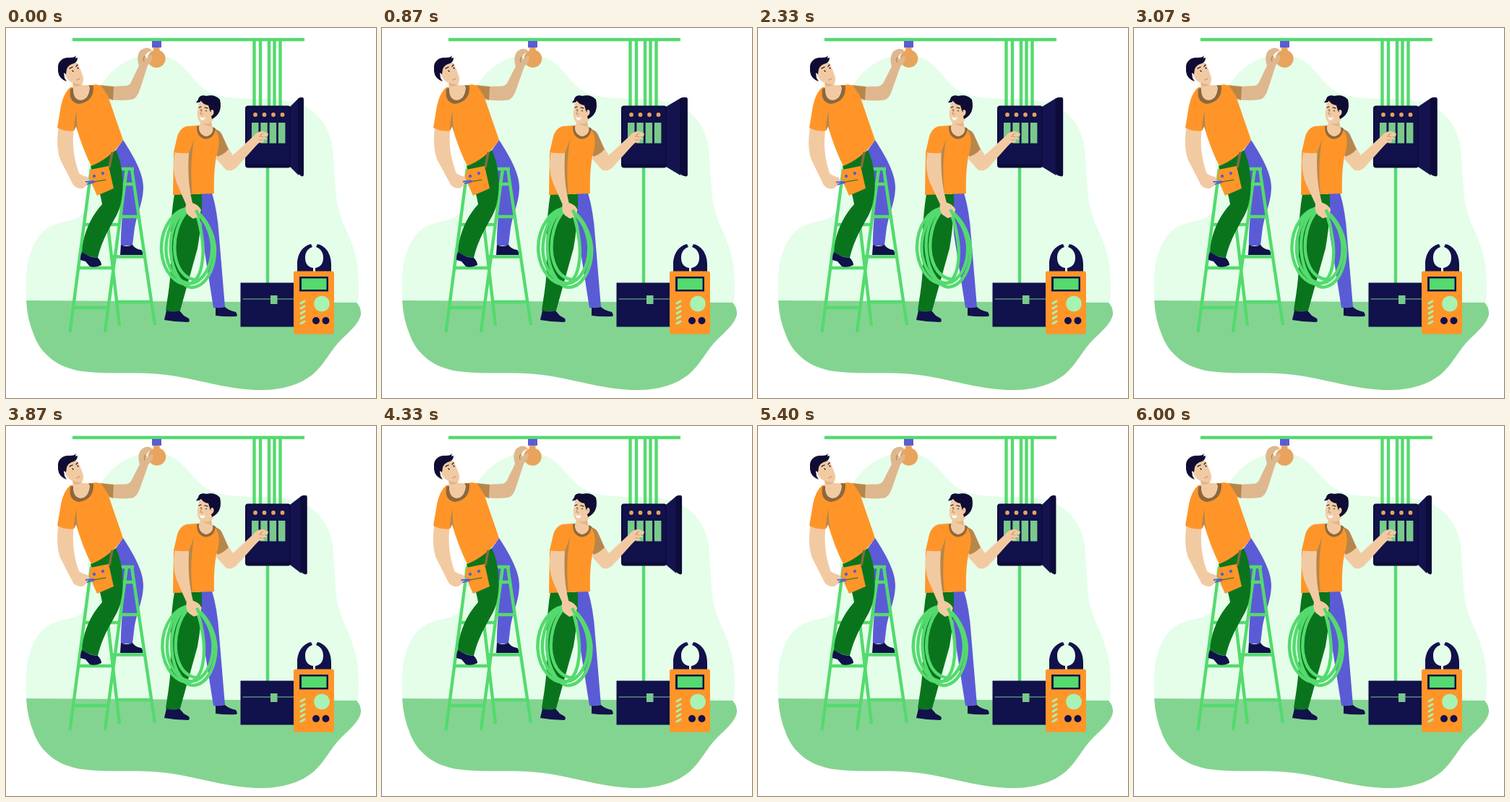
Write an HTML page that moves like this. It is 512 by 512 pixels and loops after 6030 ms.

```html
<!DOCTYPE html>
<html lang="en">
<head>
<meta charset="utf-8">
<title>Electricians at work</title>
<style>
html, body { margin: 0; width: 100%; height: 100%; overflow: hidden; background: #fff; }
svg { display: block; width: 100vw; height: 100vh; }
.wire { fill: none; stroke: #54da6e; stroke-width: 4.4; }
.thin { fill: none; stroke-width: 1.2; stroke-linecap: round; }
.navy { fill: #11114b; }
.hair { fill: #0f0c33; }
.orange { fill: #ff9528; }
.copper { fill: #e8a35c; }
.brown { fill: #b8864a; }
.collar { fill: #8a6840; }
.skin { fill: #f2caa2; }
.shade { fill: #dfb78f; }
.violet { fill: #5b5bd6; }
.green { fill: #0a741d; }
.sage { fill: #7ac98b; }
</style>
</head>
<body>
<svg viewBox="0 0 512 512">
  <!-- backdrop -->
  <path fill="#e4fee9" d="M28 378C26 340 29 305 51 282C68 266 88 270 102 261C121 247 112 195 111 150C112 105 130 72 157 52C180 36 206 33 226 41C251 51 259 79 286 91C314 102 360 94 396 102C426 109 446 133 451 160C456 188 453 220 460 250C467 277 484 300 487 335Q489 355 487 381Z"/>
  <path fill="#84d491" d="M28 377L485 380Q492 387 491 397C488 410 475 420 464 431C449 446 441 465 426 478C405 496 376 502 345 501C300 499 267 486 222 480C180 475 145 480 105 475C72 470 49 452 39 426Q29 402 28 377Z"/>

  <!-- wiring and fuse box -->
  <path class="wire" d="M92 16H413M343.500 18V109M352 18V109M364 18V109M371.500 18V109M379.500 18V109M362 190V354"/>
  <path id="doorFace" fill="#15134f"/>
  <path id="doorRim" fill="#0d0b38"/>
  <rect x="331" y="107.500" width="63" height="86" rx="4" fill="#0d0b38"/>
  <rect x="333" y="109.500" width="59" height="79" rx="3" class="navy"/>
  <g id="fuses"></g>

  <!-- toolbox and clamp meter -->
  <path class="navy" d="M324.500 352.500H400V413.500H324.500Z"/>
  <path class="thin" stroke="#7ac98b" d="M328 375H399"/>
  <rect class="sage" x="366" y="370" width="9.500" height="12"/>
  <path class="navy" d="M403 338V327C403 311 412 301 422 299L424 303C416 306 414 312 414 318C414 326 418 331 425 332V338ZM450 338V327C450 311 441 301 431 299L429 303C437 306 439 312 439 318C439 326 435 331 428 332V338Z"/>
  <rect class="orange" x="398" y="336.500" width="56" height="87" rx="3"/>
  <rect class="navy" x="406" y="344" width="40" height="20.500"/>
  <rect x="409" y="346.500" width="34.500" height="15.500" fill="#54da6e"/>
  <circle cx="437" cy="381.500" r="10.800" fill="#a8f3b4"/>
  <path d="M408 381l5-3m-5 10l5-3m-5 10l5-3m-5 10l5-3m-5 10l5-3" fill="none" stroke="#a8f3b4" stroke-width="3" stroke-linecap="round"/>
  <circle class="navy" cx="429" cy="405" r="5"/>
  <circle class="navy" cx="442.500" cy="405" r="5"/>

  <!-- man on the ladder -->
  <path class="violet" d="M150 172L162 155C175 175 190 200 190 220C190 240 182 255 178 276L175 301H159C158 275 165 240 160 215Z"/>
  <path class="navy" d="M159 300Q167 304 175 300Q179 306 187 307Q190 310 189 314H158Z"/>
  <path class="wire" d="M117 195H177M118 195L88.500 421M167 195L137 421M132 195L157 412M174 195L206 411M156 216H178M160 261H184M145 316.500H191M151 379H201M108 272H158M100 332H150M94 387H142"/>
  <path class="green" d="M117 191L152 169C162 190 164 220 159 242C156 262 137 278 127 318Q117 317 105 311C106 285 118 260 133 244C130 225 122 205 117 191Z"/>
  <path class="navy" d="M105 310Q115 317 127 318Q132 323 132 328Q125 332 116 330L110 323L103 321Q103 314 105 310Z"/>
  <g id="bulb">
    <path class="copper" d="M204 26H212.500V32H204Z"/>
    <circle class="copper" cx="208.300" cy="42.500" r="12.300"/>
  </g>
  <rect class="violet" x="202" y="18" width="13" height="9"/>
  <g id="raisedArm">
    <path class="shade" d="M144 81L166 80Q172 79 174 73L184 52C181 43 182 36 186 31Q192 26 198 28L202 31L196 34L192 39L195 42L200 37L203 39L201 46L196 52L185 86Q181 98 174 99Q160 101 142 99Z"/>
    <path class="thin" stroke="#b8864a" d="M192 39Q189 42 191 46"/>
  </g>
  <path class="brown" d="M130 79L149 81L148 100L140 96Z"/>
  <path id="loweredArm" class="skin" d="M73 134C69 160 72 175 76 184L93 217Q98 223 106 222L113 217L111 213L116 211L113 206Q106 205 101 201C94 181 91 162 94 138L88 120Z"/>
  <path class="orange" d="M89 82Q80 89 76 108L71 138Q83 144 94 142L97 136Q105 165 118 191Q145 180 162 155L141 94L132 80Q126 77 118 79Z"/>
  <path class="brown" d="M98 115Q94 127 94 142L97 136L100 144Q97 130 98 115Z"/>
  <path class="collar" d="M89 84Q86 103 101 105Q122 102 121 80L115 79Q117 97 103 100Q93 99 93 83Z"/>
  <path class="skin" d="M82 54C88 47 98 46 100 50L106 65Q109 75 104 78L100 79Q113 78 116 82Q115 98 104 100Q93 99 93 85L92 76Q84 73 81 62Z"/>
  <path class="shade" d="M93 75Q99 79 106 77Q100 83 93 80Z"/>
  <path class="hair" d="M72 56C71 47 78 41 86 41C91 41 95 41 97 38L96 42L99 41Q99 47 94 49Q86 51 84 57L83 64L80 62L81 69L84 74Q73 70 72 60Z"/>
  <path class="thin" stroke="#0f0c33" d="M88 56l4-2M97 53l2-2M92 59l1 1M99 55l1 1"/>
  <path class="thin" stroke="#c88" d="M98 72l4-2"/>
  <path d="M147 172Q145 182 143 193" fill="none" stroke="#8a6840" stroke-width="3.500"/>
  <path class="orange" d="M117 196L142 191Q145 204 149 222L126 232L115 207Z"/>
  <circle class="violet" cx="122" cy="205" r="2.200"/>
  <circle class="violet" cx="134" cy="201" r="2.200"/>
  <path class="thin" stroke="#0a741d" stroke-width="1.500" d="M121 213L138 210"/>
  <path id="pliers" d="M110 213L122 212M112 216L123 213" fill="none" stroke="#5b5bd6" stroke-width="2"/>

  <!-- man at the fuse box -->
  <path class="violet" d="M268 229L285 228Q293 255 295 290L303 386Q296 389 287 387L271 285Z"/>
  <path class="green" d="M233 230H271Q272 265 265 305L241 391Q231 395 221 391C224 370 228 350 228 325C227 290 228 260 233 230Z"/>
  <path class="navy" d="M222 391Q232 394 240 391L246 398L253 402Q255 406 252 407Q235 407 219 404ZM290 387Q297 388 303 386Q308 391 318 393Q321 397 319 399Q304 400 290 398Z"/>
  <path class="skin" d="M294 172L306 164L314 176L342 150Q348 142 356 143L363 146L362 150L357 150L362 154L356 154L357 158L350 159L346 163L319 193Q311 200 304 196L291 181Z"/>
  <path class="thin" stroke="#c89b70" d="M355 146l-4 4 5 1M350 155l5 0"/>
  <path class="brown" d="M285 138Q297 141 300 150L308 168Q300 176 292 178L286 160Z"/>
  <path class="orange" d="M250 136Q240 139 237 151L232 174L231 231L288 229Q287 200 291 178Q300 150 287 138L276 134Z"/>
  <path class="brown" d="M261 151Q251 170 250 195L247 229H258C255 205 256 175 261 151Z"/>
  <g id="ropeArm">
    <g class="wire">
      <path d="M258 250C235 246 214 275 215 308C217 338 236 357 254 354C272 348 274 315 272 296C270 280 268 266 262 254"/>
      <path d="M256 252C236 252 226 285 228 310C230 340 246 360 258 359C278 357 290 330 289 304C287 282 276 264 264 254"/>
      <path d="M250 250C230 256 219 290 222 315C226 342 246 358 262 352C279 343 286 322 285 300C283 280 274 264 262 254"/>
      <path d="M252 252C238 266 231 292 234 314C238 338 250 349 268 349"/>
    </g>
    <path class="skin" d="M235 160L232 184Q231 200 236 214L249 244Q247 253 252 259L259 264L267 261L270 252Q267 245 258 242C254 225 251 205 253 173L255 160Z"/>
    <path class="wire" d="M263 252L268 262"/>
  </g>
  <path class="orange" d="M250 136Q240 139 237 151L232 172Q243 174 253 173L261 152Z"/>
  <path class="collar" d="M264 136Q264 152 276 153.500Q288 153 290 139L286 137Q286 149 276 150Q267 147 268 135Z"/>
  <path class="skin" d="M267 104C274 98 286 101 289 108Q291 121 284 131L286 138Q288 147 277 150Q266 147 267 136L269 131Q264 126 265 116Z"/>
  <path class="shade" d="M270 131Q277 135 284 130L285 136Q278 137 270 131Z"/>
  <path class="hair" d="M263 103Q266 100 267 96Q270 92 277 94Q289 91 296 99C299 112 295 121 285 126L284 122Q289 119 287 114Q284 111 283 117L280 107Q273 106 270 101Q267 104 263 103Z"/>
  <path class="thin" stroke="#0f0c33" d="M267 110l3-1M275 110l4 1M270 113v1M277 114v1"/>
  <path d="M267 122Q271 126 276 123Q274 129 270 127Z" fill="#fff"/>
  <path class="thin" stroke="#c89b70" d="M271 114l-2 5 3 1"/>
</svg>
<script>
const LOOP = 6030;
const el = id => document.getElementById(id);
const mix = (a, b, k) => a + (b - a) * k;
const ease = k => (1 - Math.cos(Math.PI * k)) / 2;

// Eased value at t through [time, value] stops.
function along(stops, t) {
  const i = stops.findIndex(([time]) => time > t);
  if (i < 0) return stops.at(-1)[1];
  const [t0, a] = stops[i - 1], [t1, b] = stops[i];
  return mix(a, b, ease((t - t0) / (t1 - t0)));
}

const turn = (id, angle, x, y) => el(id).setAttribute("transform", `rotate(${angle} ${x} ${y})`);

const doorEdge = [[0, 412], [1080, 424], [6000, 412]];
const ropeSwing = [[0, 0], [500, 0], [1700, 1], [5100, -0.05], [6000, 0]];
const handSwing = [[0, 0], [800, 2], [1950, -2.3], [3600, 0.1], [4770, -1], [6000, 0]];
const screwing = [[0, 0], [600, 1], [1500, 0]];

for (let i = 0; i < 4; i++) {
  const x = 340 + i * 12.3;
  el("fuses").innerHTML += `<rect class="sage" x="${x}" y="131" width="9.500" height="28.500"/>
    <circle class="copper" cx="${345 + i * 12.5}" cy="120" r="2.900"/>`;
}

function draw(t) {
  const edge = along(doorEdge, t);
  const rim = edge - 8 - (edge - 412) * 0.25;
  el("doorFace").setAttribute("d", `M393 109L${rim + 1} 97V204L393 192Z`);
  el("doorRim").setAttribute("d",
    `M${rim} 98Q${rim + 2} 96 ${rim + 4} 96H${edge - 2}Q${edge} 96 ${edge} 99V203Q${edge} 205 ${edge - 2} 205.500L${rim + 3} 204L${rim} 201Z`);

  turn("ropeArm", -2.1 * along(ropeSwing, t), 242, 155);
  const swing = along(handSwing, t) * -0.59;
  turn("loweredArm", swing, 85, 115);
  turn("pliers", swing, 85, 115);

  const twist = along(screwing, t % (LOOP / 4));
  turn("raisedArm", 1.8 * twist, 142, 90);
  turn("bulb", -2.5 * twist, 208, 24);
}

function tick() {
  draw(performance.now() % LOOP);
  requestAnimationFrame(tick);
}
tick();
</script>
</body>
</html>
```
